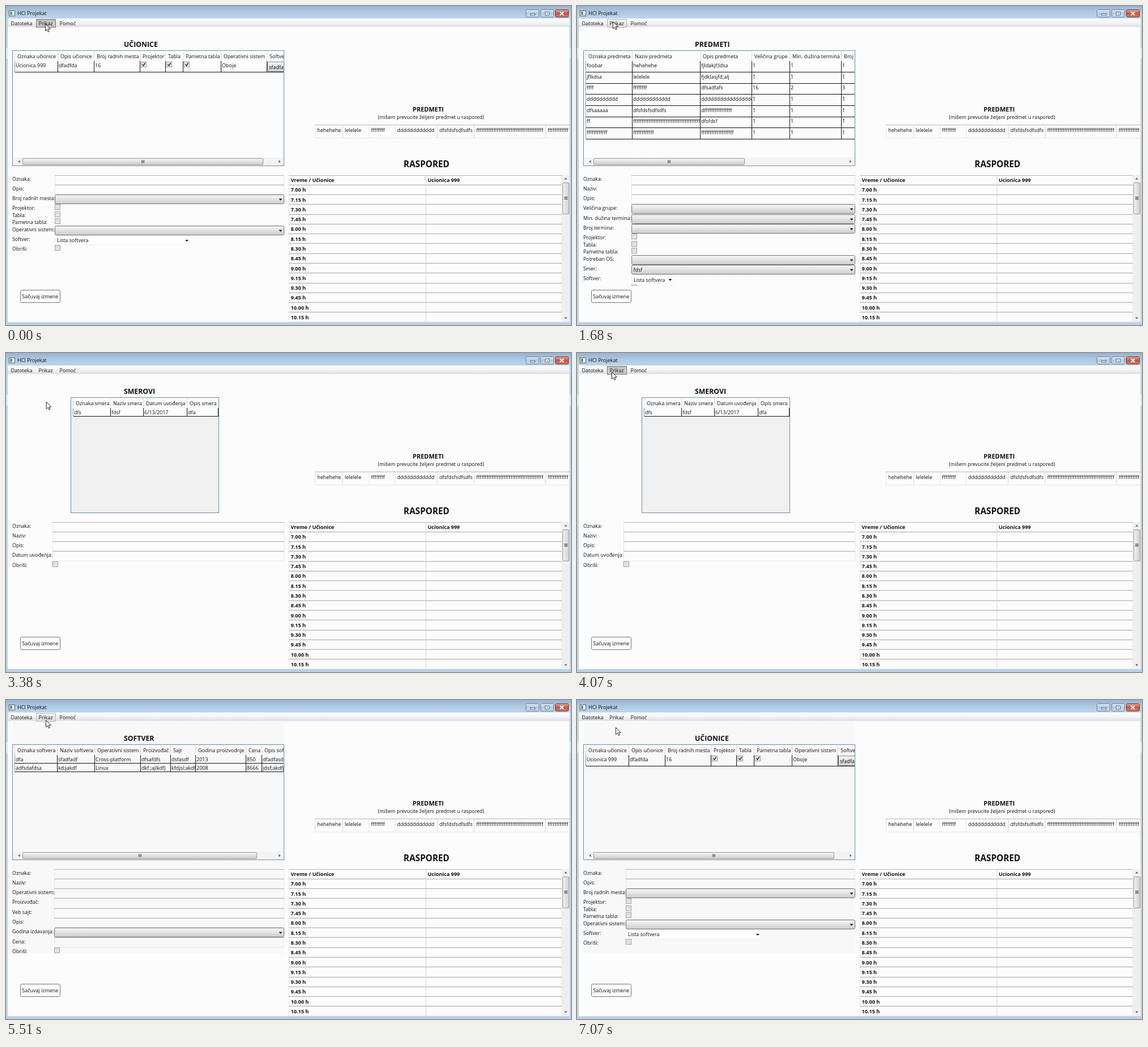
These frames come from a looping animation (997 by 562 pixels, 8 s). An HTML page:

```html
<!DOCTYPE html>
<html lang="sr">
<head>
<meta charset="utf-8">
<title>HCI Projekat</title>
<style>
html, body { margin: 0; width: 100%; height: 100%; overflow: hidden; background: #fcfcfc; }
svg { display: block; }
text { font-family: "Open Sans", "Noto Sans", sans-serif; font-variant-ligatures: none; fill: #111; white-space: pre; }
</style>
</head>
<body>
<svg id="stage" width="997" height="562" viewBox="0 0 997 562"></svg>
<script>
const LOOP = 8000, ROW = 17.28, CHECK_ROW = 12.5;
const stage = document.getElementById("stage");
const snap = v => Math.floor(v) + .5;

// Basic shapes
const rect = (x, y, w, h, fill, stroke = "none", r = 0) =>
  `<rect x="${x}" y="${y}" width="${w}" height="${h}" rx="${r}" fill="${fill}" stroke="${stroke}"/>`;
const line = (x1, y1, x2, y2, stroke, w = 1) =>
  `<path d="M${x1} ${y1}L${x2} ${y2}" stroke="${stroke}" stroke-width="${w}"/>`;
const shape = (d, fill = "#222", stroke = "none") => `<path d="${d}" fill="${fill}" stroke="${stroke}"/>`;
const text = (x, y, s, size = 8.95, extra = "") =>
  `<text x="${x}" y="${(y + size * 0.36).toFixed(2)}" font-size="${size}" ${extra}>${s}</text>`;
const bold = (x, y, s, size = 9.1, extra = "") => text(x, y, s, size, 'font-weight="700" ' + extra);
const clip = (x, y, w, h, body) =>
  `<svg x="${x}" y="${y}" width="${w}" height="${h}" viewBox="${x} ${y} ${w} ${h}" overflow="hidden">${body}</svg>`;
const gradient = (id, ...colors) =>
  `<linearGradient id="${id}" x2="0" y2="1">${colors.map((c, i) =>
    `<stop offset="${i / (colors.length - 1)}" stop-color="${c}"/>`).join("")}</linearGradient>`;
const repeat = (n, f) => Array.from({ length: n }, (_, i) => f(i)).join("");

// Widgets
const downArrow = (x, y) => shape(`M${x - 3} ${y - 1.5}h6l-3 3.2z`, "#111");
const textBox = (x, y, w, h = ROW) => {
  const left = snap(x), right = snap(x + w - .5), top = snap(y), bottom = snap(y + h) - 1;
  return shape(`M${left} ${top}V${bottom}H${right}V${top}`, "none", "#e6e8ec") +
    line(left - .5, top, right + .5, top, "#b4b6bb");
};
const combo = (x, y, label) => {
  const top = snap(y), left = snap(x);
  return rect(left, top, 490.5 - left, 16, "url(#button)", "#747474", 2) +
    downArrow(484.5, top + 8.5) + (label ? text(x + 3, top + 8.3, label) : "");
};
const flatCombo = (x, y, w) =>
  rect(snap(x), snap(y), w, 16, "#fefefe", "#f1f1f1") + text(x + 3.5, y + 8.6, "Lista softvera") + downArrow(x + w - 6, y + 8.8);
const checkBox = (x, y, on) =>
  rect(x + .5, y + .5, 9, 9, "#f4f4f4", "#999") + rect(x + 2.5, y + 2.5, 5, 5, "url(#checkFill)", "#d3d6da") +
  (on ? `<path d="M${x + 2.5} ${y + 4.6}l2 2.6l3.3 -5" fill="none" stroke="#212a78" stroke-width="1.5"/>` : "");
const hScroll = end => {
  const mid = Math.floor((30 + end) / 2) + .5;
  return rect(12, 267, 478, 14, "#f3f3f3") + rect(29.5, 268.5, end - 29, 11, "url(#button)", "#979797", 1.5) +
    repeat(3, i => line(mid - 2 + i * 2, 271.5, mid - 2 + i * 2, 276.5, "#444")) +
    shape("M24.5 271.5v5l-3 -2.5z", "#555") + shape("M481.5 271.5v5l3 -2.5z", "#555");
};

const CHECKED = true;
const rooms = {
  title: "UČIONICE", thumb: 453, edges: [16, 92, 156, 237, 282, 313, 380, 461, 520], rowH: 19.6,
  heads: ["Oznaka učionice", "Opis učionice", "Broj radnih mesta", "Projektor", "Tabla", "Pametna tabla", "Operativni sistem", "Softver"],
  rows: [["Ucionica 999", "dfadfda", "16", CHECKED, CHECKED, CHECKED, "Oboje", { button: "sfadfadf" }]],
  field: 86.5, listW: 238.5,
  form: [["Oznaka:", "text"], ["Opis:", "text"], ["Broj radnih mesta:", "combo"], ["Projektor:", "check"], ["Tabla:", "check"],
    ["Pametna tabla:", "check"], ["Operativni sistem:", "combo"], ["Softver:", "list"], ["Obriši:", "check"]]
};
const f = n => "f".repeat(n), d = n => "d".repeat(n);
const subjects = {
  title: "PREDMETI", thumb: 295, edges: [16, 98, 218, 309, 376, 467, 540], rowH: 19.6,
  heads: ["Oznaka predmeta", "Naziv predmeta", "Opis predmeta", "Veličina grupe", "Min. dužina termina", "Broj termina"],
  rows: [
    ["foobar", "hehehehe", "fjldakjf;ldsa", "1", "1", "1"],
    ["jflkdsa", "lelelele", "fjdklasjfd;alj", "1", "1", "1"],
    [f(4), f(8), "dfsadfafs", "16", "2", "3"],
    [d(10), d(12), d(17), "1", "1", "1"],
    ["dfsaaaaa", "dfsfdsfsdfsdfs", "d" + f(16), "1", "1", "1"],
    [f(2), f(39), "dfsfdsf", "1", "1", "1"],
    [f(12), f(12), f(19), "1", "1", "1"]],
  field: 96.5, listW: 74,
  form: [["Oznaka:", "text"], ["Naziv:", "text"], ["Opis:", "text"], ["Veličina grupe:", "combo"], ["Min. dužina termina:", "combo"],
    ["Broj termina:", "combo"], ["Projektor:", "check"], ["Tabla:", "check"], ["Pametna tabla:", "check"],
    ["Potreban OS:", "combo"], ["Smer:", "combo", "fdsf"], ["Softver:", "list"], ["", "check"]]
};
const majors = {
  title: "SMEROVI", left: 114.5, right: 375.5, edges: [119, 185, 243, 320, 375], rowH: 14.8,
  heads: ["Oznaka smera", "Naziv smera", "Datum uvođenja", "Opis smera"],
  rows: [["dfs", "fdsf", "6/13/2017", "dfa"]],
  field: 82, form: [["Oznaka:", "text"], ["Naziv:", "text"], ["Opis:", "text"], ["Datum uvođenja:", "text"], ["Obriši:", "check"]]
};
const software = {
  title: "SOFTVER", thumb: 442, edges: [16, 91, 157, 238, 291, 335, 424, 452, 520], rowH: 14.8,
  heads: ["Oznaka softvera", "Naziv softvera", "Operativni sistem", "Proizvođač", "Sajt", "Godina proizvodnje", "Cena", "Opis softvera"],
  rows: [
    ["dfa", "sfadfadf", "Cross-platform", "dfsafdfs", "dsfasdf", "2013", "850", "dfadfasdf"],
    ["adfsdafdsa", "kd;jakdf", "Linux", "dkf,;ajlkdfj", "kfdjsl;akdfj", "2008", "8666", "jdsf;akdfj"]],
  field: 85.5,
  form: [["Oznaka:", "text"], ["Naziv:", "text"], ["Operativni sistem:", "text"], ["Proizvođač:", "text"], ["Veb sajt:", "text"],
    ["Opis:", "text"], ["Godina izdavanja:", "combo"], ["Cena:", "text"], ["Obriši:", "check"]]
};
const views = [rooms, subjects, majors, software];

function cell(value, x, y, w, h) {
  if (value === CHECKED) return checkBox(x + 1, y + 1, true);
  if (value.button) return rect(x + .5, y + 1.5, 50, 17, "url(#button)", "#8a8a8a", 2) + text(x + 3, y + 10.5, value.button);
  return clip(x, y, w - 1, h, text(x + 1.1, y + 8, value));
}

function grid(v) {
  const { edges, rowH, left = 11.5, right = 490.5 } = v, first = edges[0];
  const end = Math.min(right, edges[edges.length - 1]), bottom = snap(97 + rowH * v.rows.length);
  let s = v.thumb ? "" : rect(left, 78.5, right - left, 203, "#f0f0f0") + rect(left, 79, right - left, 17.5, "#fcfcfc") +
    rect(first, 97, end - first, rowH, "#fefefe");
  s += `<g class="headHover">${rect(first, 79.5, edges[1] - first - 1, 17, "url(#hot)")}</g>`;
  v.heads.forEach((h, i) => {
    const x = edges[i], w = edges[i + 1] - x;
    s += line(x - .5, 80, x - .5, 96.5, "#d9d9d9") + clip(x, 80, w, 17, text(x + 4.1, 88.9, h));
  });
  v.rows.forEach((row, r) => {
    const y = 97 + r * rowH, base = snap(y + rowH);
    row.forEach((value, i) => { s += cell(value, edges[i], y, edges[i + 1] - edges[i], rowH); });
    s += line(first, base, end, base, "#111");
  });
  edges.forEach((x, i) => { s += line(x - .5, 97, x - .5, bottom, i ? "#111" : "#999"); });
  return clip(left, 78, right - left, 204, s + (v.thumb ? hScroll(v.thumb) : "")) +
    rect(left, 78.5, right - left, 203, "none", "#688caf");
}

function form(v) {
  let y = 298, s = "";
  const x = v.field;
  for (const [label, kind, value] of v.form) {
    if (kind === "text") s += textBox(x, y, 490.5 - x);
    if (kind === "combo") s += combo(x, y, value);
    if (kind === "list") s += flatCombo(x, y, v.listW);
    if (kind === "check") s += checkBox(Math.floor(x), Math.floor(y), false);
    s += text(11, y + 6.4, label, 8.85);
    y += kind === "check" ? CHECK_ROW : ROW;
  }
  return clip(10, 290, 482, 203, s);
}

const view = v => `<g class="view">${bold(208, 68, v.title, 12.3)}${grid(v)}${form(v)}</g>`;

function frame() {
  const glass = (x, fill, edge) => rect(x + .5, 6.5, 23, 13, fill, edge, 2);
  return rect(0, 0, 997, 562, "#bad1e8") + rect(0, 0, 997, 22, "url(#title)") +
    rect(0, 74, 3, 19, "#c9f1fb") + rect(994, 74, 3, 19, "#c9f1fb") +
    rect(5.5, 8.5, 10, 9, "#fff", "#51606b") + rect(7, 10, 4, 6, "#5d9a86") +
    text(20, 13, "HCI Projekat", 9) +
    glass(917, "url(#glass)", "#6d86a0") + glass(943, "url(#glass)", "#6d86a0") + glass(969, "url(#close)", "#6e3a38") +
    rect(925.5, 13.5, 8, 2.5, "#fff", "#5d6c7b") + rect(951.5, 10.5, 7, 5.5, "#fff", "#5d6c7b") + rect(954, 12.5, 2.5, 1.5, "#6f8296") +
    `<path d="M977.5 10.3l6.5 5.6m0 -5.6l-6.5 5.6" stroke="#fff" stroke-width="2"/>` +
    rect(3, 22, 991.5, 535, "#fcfcfc") + rect(3, 22, 991.5, 15, "url(#menu)");
}

function menu() {
  return `<g id="hover">${rect(53.5, 23.5, 34, 14, "url(#menuHot)", "#b3b3b3")}</g>` +
    `<g id="pressed">${rect(53.5, 23.5, 34, 14, "url(#menuDown)", "#777")}</g>` +
    text(8.5, 30.6, "Datoteka") + text(57.5, 30.6, "Prikaz") + text(94.5, 30.6, "Pomoć");
}

function schedule() {
  const mid = 'text-anchor="middle"';
  const cards = ["hehehehe", "lelelele", f(8), d(12), "dfsfdsfsdfsdfs", f(39), f(12)];
  const cuts = [545.5, 594, 640.5, 686.5, 761, 826, 952, 994.5];
  let s = bold(745, 182, "PREDMETI", 11, mid) + text(750, 195.5, "(mišem prevucite željeni predmet u raspored)", 8.87, mid) +
    bold(742, 278, "RASPORED", 15.3, mid);
  cards.forEach((c, i) => {
    const w = cuts[i + 1] - cuts[i];
    s += textBox(cuts[i], 209, w, 24) + clip(cuts[i], 210, w, 22, text(cuts[i] + 3.8, 219, c));
  });
  const rows = repeat(15, i => {
    const y = 298 + i * ROW, t = 405 + i * 15;
    const label = i ? `${Math.floor(t / 60)}.${String(t % 60).padStart(2, "0")} h` : "Vreme / Učionice";
    return textBox(499, y, 241.5) + textBox(741, y, 240) + bold(502.5, y + 8.8, label) +
      (i ? "" : bold(744, y + 8.8, "Ucionica 999"));
  });
  s += clip(499, 297, 483, 260, rows);
  s += rect(981.5, 298, 13, 259, "#efefef") + rect(982.5, 311.5, 11, 55, "url(#thumb)", "#979797", 1.5) +
    repeat(3, i => line(985, 336.5 + i * 2, 991, 336.5 + i * 2, "#444")) +
    shape("M985.3 305.5h5l-2.5 -3z", "#555") + shape("M985.3 548.5h5l-2.5 3z", "#555");
  return s;
}

stage.innerHTML =
  `<defs>${gradient("title", "#97b3d1", "#b0c9e3", "#bdd4eb")}${gradient("menu", "#fdfdfd", "#f3f4f6", "#dcdee3")}
  ${gradient("button", "#f3f3f3", "#ebebeb", "#dadada", "#cfcfcf")}${gradient("checkFill", "#ced2d7", "#f4f4f4")}
  ${gradient("glass", "#dce8f4", "#b2c8de", "#c9dcee")}${gradient("close", "#e6aaa0", "#c9533e", "#d87d67")}
  ${gradient("hot", "#e6f7fd", "#d3f0fc", "#bce7fa")}${gradient("menuHot", "#f4f4f4", "#dedede")}
  ${gradient("menuDown", "#b9b9b9", "#cfcfcf", "#c3c3c3")}
  <linearGradient id="thumb"><stop stop-color="#f3f3f3"/><stop offset="1" stop-color="#d0d0d0"/></linearGradient></defs>` +
  frame() + menu() + `<g id="shade">${rect(11, 38, 480, 408, "#f8f8f8")}</g>` + views.map(view).join("") +
  rect(25.5, 500.5, 70, 22, "#fdfdfd", "#747474", 2) + text(28.3, 512, "Sačuvaj izmene") + schedule() +
  `<path id="cursor" d="M.5 .5V13L3.4 10.3 5.3 14.6 7.3 13.7 5.4 9.5H9.3Z" fill="#fff" stroke="#111" stroke-width=".9" stroke-linejoin="round"/>`;

// Mouse moves: start, end, step count, destination
const moves = [
  [220, 480, 6, 69, 70], [1270, 1680, 9, 63, 27], [2320, 2610, 6, 71, 88], [3380, 3700, 8, 61, 33],
  [4230, 4480, 6, 73, 103], [4980, 5330, 8, 70, 37], [5510, 5510, 1, 70, 35], [5690, 5750, 3, 70, 29],
  [6330, 6420, 3, 68, 48]];
const pressedSpans = [[0, 940], [2080, 2850], [4070, 4860], [5930, 7070]];
const switches = [[0, 0], [970, 1], [2910, 2], [4860, 3], [7070, 0]];

function pointer(t) {
  let x = 69, y = 31;
  for (const [start, end, steps, tx, ty] of moves) {
    if (t < start) break;
    const gap = steps > 1 ? (end - start) / (steps - 1) : 1;
    const p = Math.min(1, (Math.floor((t - start) / gap + 1e-6) + 1) / steps);
    const e = p * p * (3 - 2 * p);
    x += (tx - x) * e;
    y += (ty - y) * e;
  }
  return [x, y];
}

const byId = id => document.getElementById(id);
const [hover, pressed, shade, cursor] = ["hover", "pressed", "shade", "cursor"].map(byId);
const groups = [...document.querySelectorAll(".view")];
const headHovers = [...document.querySelectorAll(".headHover")];
const show = (el, on) => { el.style.display = on ? "" : "none"; };

function draw(t) {
  const [x, y] = pointer(t);
  const down = pressedSpans.some(([a, b]) => t >= a && t < b);
  const current = switches.filter(([at]) => t >= at).pop()[1];
  const [from, to] = views[current].edges;
  const overHead = !down && y >= 79 && y < 97 && x >= from && x < to;
  show(pressed, down);
  show(hover, !down && y < 38);
  show(shade, t >= 4860);
  groups.forEach((g, i) => show(g, i === current));
  headHovers.forEach((h, i) => show(h, overHead && i === current));
  cursor.setAttribute("transform", `translate(${x.toFixed(1)} ${y.toFixed(1)})`);
}

const begin = performance.now();
function tick() {
  draw((performance.now() - begin) % LOOP);
  requestAnimationFrame(tick);
}
tick();
</script>
</body>
</html>
```
